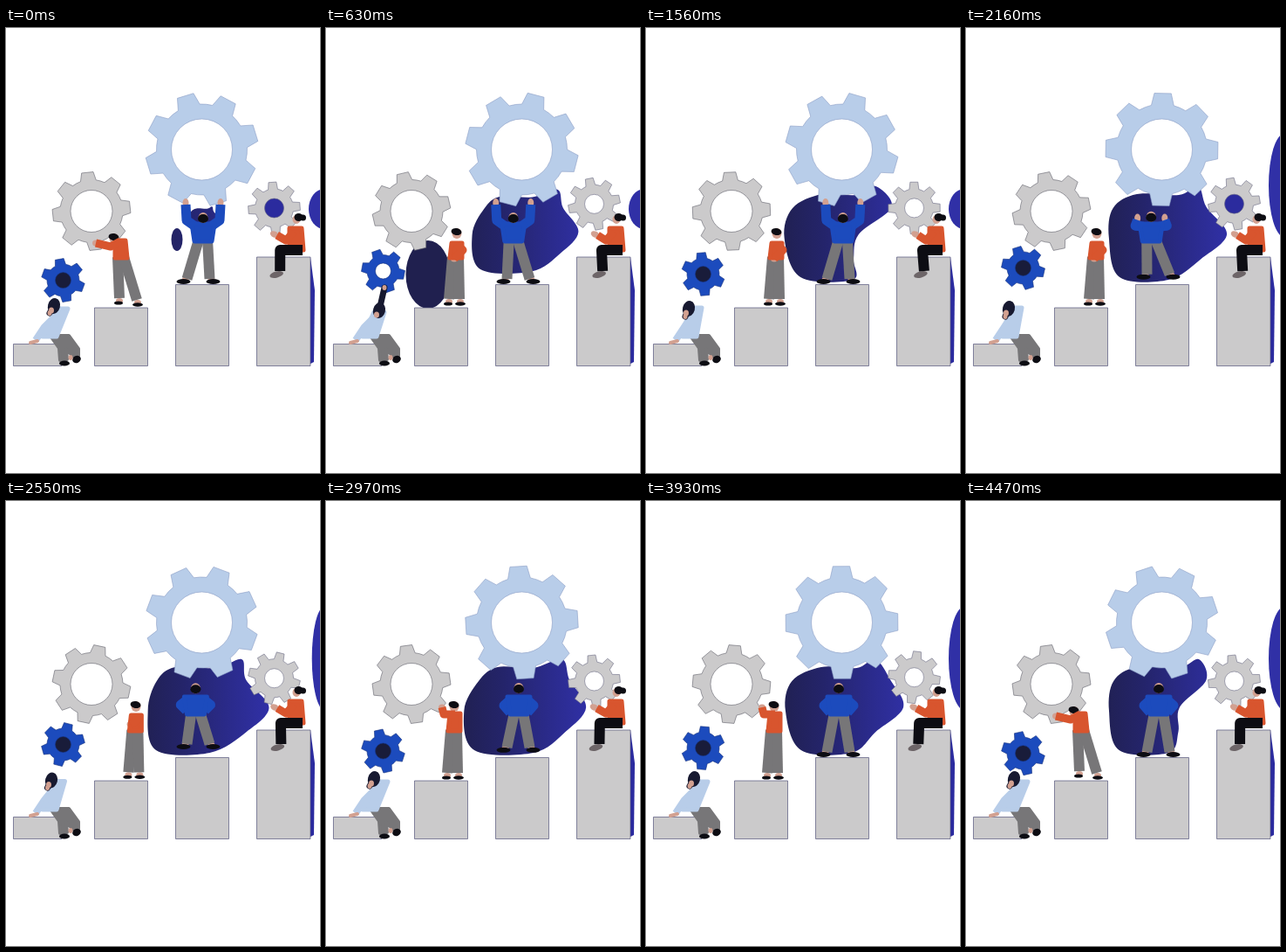
An HTML page for the animation above (4500 ms loop, 360 by 509 pixels).

```html
<!DOCTYPE html>
<html lang="en">
<head>
<meta charset="utf-8">
<title>Gears</title>
<style>
html, body { margin: 0; width: 100%; height: 100%; overflow: hidden; background: #fff; }
svg { display: block; width: 100vw; height: 100vh; }
</style>
</head>
<body>
<svg viewBox="0 0 360 509" stroke-linejoin="round">
  <defs>
    <linearGradient id="ink" gradientUnits="userSpaceOnUse" x1="150" y1="0" x2="300" y2="0">
      <stop offset="0" stop-color="#20204f"/>
      <stop offset=".35" stop-color="#24246a"/>
      <stop offset="1" stop-color="#3030a6"/>
    </linearGradient>
  </defs>
  <g id="scene"></g>
</svg>
<script>
const LOOP = 4500, STEP = 30;
const C = {
  box: '#cbcacb', pale: '#b8cde9', blue: '#1c4bbd', orange: '#d8552e',
  skin: '#d2a090', pants: '#777678', black: '#0d0d13', dark: '#171930', ink: 'url(#ink)'
};

// Timing helpers, t in ms
const wave = (t, cycles, peak = 0) => Math.cos(2 * Math.PI * cycles * (t - peak) / LOOP);
const near = (t, when, span) => Math.abs(t - when) < span;
const bump = (t, when, span) => near(t, when, span) ? (1 + Math.cos(Math.PI * (t - when) / span)) / 2 : 0;
const ease = (t, from, to) => {
  const k = Math.max(0, Math.min(1, (t - from) / (to - from)));
  return k * k * (3 - 2 * k);
};
const mix = (a, b, k) => a.map((v, i) => v + (b[i] - v) * k);

// SVG helpers
const n = v => +v.toFixed(2);
const path = (d, fill, more = '') => `<path d="${d}" fill="${fill}" ${more}/>`;
const oval = (x, y, rx, ry, fill, turn = 0) =>
  `<ellipse cx="${n(x)}" cy="${n(y)}" rx="${n(rx)}" ry="${n(ry)}" fill="${fill}" transform="rotate(${turn} ${n(x)} ${n(y)})"/>`;
const limb = (p, w, color, cap = 'butt') =>
  `<polyline points="${p.map(n)}" fill="none" stroke="${color}" stroke-width="${w}" stroke-linecap="${cap}"/>`;
const poly = (p, fill, round = 0) =>
  `<polygon points="${p.map(n)}" fill="${fill}" stroke="${fill}" stroke-width="${round}"/>`;
const trunk = (sx, sy, hx, hy, ws, wh, fill) =>
  poly([sx - ws, sy, sx + ws, sy, hx + wh, hy, hx - wh, hy], fill, 5);

// Closed Catmull-Rom curve through [x, y] points
function blob(pts, fill) {
  const pt = i => pts[(i + pts.length) % pts.length];
  let d = 'M' + pt(0).map(n);
  for (let i = 0; i < pts.length; i++) {
    const [a, b, c, e] = [pt(i - 1), pt(i), pt(i + 1), pt(i + 2)];
    const q = [0, 1].map(k => b[k] + (c[k] - a[k]) / 6);
    const r = [0, 1].map(k => c[k] - (e[k] - b[k]) / 6);
    d += 'C' + [...q, ...r, ...c].map(n);
  }
  return path(d + 'Z', fill);
}

function gear(x, y, turn, teeth, R, root, hole, fill, edge) {
  const step = 360 / teeth;
  const p = (r, deg) => {
    const a = (deg + turn - 90) * Math.PI / 180;
    return n(x + r * Math.cos(a)) + ' ' + n(y + r * Math.sin(a));
  };
  let d = '';
  for (let i = 0; i < teeth; i++) {
    const c = i * step;
    d += (i ? `A${root} ${root} 0 0 1 ` : 'M') + p(root, c - .32 * step) +
      'L' + p(R, c - .19 * step) + 'L' + p(R, c + .19 * step) + 'L' + p(root, c + .32 * step);
  }
  d += `A${root} ${root} 0 0 1 ${p(root, -.32 * step)}Z`;
  d += `M${n(x - hole)} ${n(y)}a${hole} ${hole} 0 1 0 ${2 * hole} 0a${hole} ${hole} 0 1 0 ${-2 * hole} 0Z`;
  return path(d, fill, `fill-rule="evenodd" stroke="${edge}" stroke-width=".6"`);
}

const OUTLINE = [
  [160, 240], [171, 206], [198, 190], [240, 191], [267, 181],
  [279, 205], [302, 236], [272, 264], [236, 288], [174, 285]
];

function clouds(t) {
  // The main cloud opens around the lifter; its lower right side draws in now and then.
  const size = .25 + .75 * ease(t, 0, 850);
  const pinch = ((1 + Math.cos(2 * Math.PI * (t - 1560) / 2910)) / 2) ** 5;
  const main = OUTLINE.map(([x, y], i) => {
    if (x > 270 && y > 220) x += (242 - x) * pinch;
    x += 4 * wave(t, 2, i * 700);
    return [226 + (x - 226) * size, 212 + (y - 212) * size];
  });
  const swing = bump(t, 630, 620);
  const tall = ease(t, 1600, 2160), shown = 1 - bump(t, 2970, 600);
  return blob(main, C.ink) +
    oval(196 - 79 * swing, 242 + 40 * swing, 6.5 + 19 * swing, 13 + 26 * swing, C.ink) +
    oval(365, 207 - 27 * tall, 18 * shown, 23 + 36 * tall, C.ink);
}

function boxes() {
  const box = (x, y, w) =>
    `<rect x="${x}" y="${y}" width="${w}" height="${386.5 - y}" fill="${C.box}" stroke="#55557c" stroke-width=".7"/>`;
  return poly([349, 262, 354, 300, 353, 382, 349, 384], '#2b2ba0') +
    box(8.5, 361.5, 55.5) + box(101.5, 320, 61) + box(194.5, 293.5, 61) + box(287.5, 262, 61.5);
}

function gears(t) {
  const turns = teeth => teeth * t / LOOP;
  const by = 281.5 + 4 * wave(t, 3) + 4 * wave(t, 1, 4000);
  const ry = 203.5 + 2.5 * wave(t, 3);
  const lit = near(t, 0, 250) || near(t, 2160, 250);
  return gear(224.5, 139, -17 + 45 * turns(5), 8, 65, 52, 35, C.pale, '#8a9cc4') +
    gear(98, 209.5, -6 + 45 * turns(6), 8, 45, 36, 24, C.box, '#62626c') +
    oval(65.5, by, 10, 10, near(t, 630, 350) ? '#fff' : '#191c3a') +
    gear(65.5, by, -10 + 60 * turns(6), 6, 25, 18.5, 9, C.blue, '#16327c') +
    oval(307.5, ry, 12, 12, lit ? '#2b2b9e' : '#fff') +
    gear(307.5, ry, -4 + 45 * turns(6), 8, 30, 22, 11, C.box, '#6b6b84');
}

// Joints: head, shoulder, hand
const SIT = { hold: [55, 318, 65, 321, 50, 326], reach: [61, 323, 61, 325, 67, 297], rest: [49, 321, 58, 320, 45, 330] };

function sitter(t) {
  const up = mix(SIT.hold, SIT.reach, bump(t, 630, 630));
  const rest = ease(t, 1000, 1500) - ease(t, 2200, 2900);
  const [hx, hy, sx, sy, ax, ay] = mix(up, SIT.rest, rest);
  return poly([51, 352, 72, 352, 83, 367, 83, 375, 77, 376, 69, 367, 70, 379, 62, 380, 61, 366], C.pants, 4) +
    oval(81, 379, 5, 4, C.black, -25) + oval(67, 383.5, 6, 3, C.black) +
    oval(74, 377, 2.5, 3, C.skin) +
    limb([sx, sy, 44, 342, 34, 357], 8, C.pale) +
    trunk(sx, sy, 50, 353, 6, 8, C.pale) +
    limb([36, 358, 28, 360], 4, C.skin, 'round') +
    limb([hx, hy, ax, ay], 7, C.dark, 'round') +
    oval(hx, hy, 7, 9, C.dark, 15) + oval(hx - 3, hy + 5, 3, 3.5, C.skin) +
    oval(ax, ay, 2.5, 3, C.skin);
}

// Joints: head, shoulder, hip, elbow, hand, left foot, right foot
const PUSH = {
  lean: [124, 241, 131, 243, 132, 264, 120, 250, 103, 246, 130, 312, 151, 314],
  stand: [150, 235, 150, 246, 149, 264, 157, 254, 147, 264, 141, 313, 154, 313],
  reach: [147, 235, 148, 243, 147, 264, 135, 244, 133, 236, 139, 314, 152, 314]
};

function pusher(t) {
  const upright = mix(PUSH.stand, PUSH.reach, ease(t, 2300, 2970));
  const leaning = 1 - ease(t, 50, 550) + ease(t, 3980, 4440);
  const [hx, hy, sx, sy, px, py, ex, ey, ax, ay, lx, ly, rx, ry] = mix(upright, PUSH.lean, leaning);
  return oval(lx, ly, 4, 3, C.skin) + oval(lx - 1, ly + 2.5, 5, 2, C.black) +
    oval(rx, ry, 4, 3, C.skin) + oval(rx, ry + 2.5, 6, 2.2, C.black) +
    limb([px - 4, py - 2, lx, ly - 3], 12, C.pants) + limb([px + 3, py - 2, rx - 1, ry - 3], 12, C.pants) +
    oval(ax, ay, 4, 3.5, C.skin) +
    trunk(sx, sy, px, py - 1, 6, 7, C.orange) +
    oval(hx, hy, 5.5, 6, C.skin) + oval(hx - .5, hy - 2, 6, 4, C.black, 10) +
    limb([sx, sy + 1, ex, ey, ax, ay], 9, C.orange);
}

function lifter(t) {
  const up = 1 - ease(t, 1700, 2700);
  const lean = 6 * (1 - wave(t, 3)) * (1 - ease(t, 2200, 2900));
  const x = 221 + 5 * up - lean, foot = 290 - 9 * bump(t, 2560, 900);
  let feet = '', hands = '', legs = '', arms = '';
  for (const side of [-1, 1]) {
    const fx = 220.5 + side * 15, hx = x + side * (10 + 10 * up), hy = 242 - 40 * up;
    feet += oval(fx, foot - 2, 4, 3, C.skin) + oval(fx + side * 2, foot, 8, 3, C.black);
    legs += limb([x + side * 5, 242, fx - side * 2, foot - 3], 12, C.pants);
    hands += oval(hx, hy - 2, 3.5, 5, C.skin);
    arms += limb([x + side * 9, 227, x + side * (17 + 2 * up), 234 - 14 * up, hx, hy], 11, C.blue);
  }
  return feet + legs + hands + arms + trunk(x, 224, x, 244, 13, 10, C.blue) +
    oval(x, 214 + 3 * up, 5.5, 6, C.skin) + oval(x, 215 + 3 * up, 6, 5, C.black);
}

function reader(t) {
  const swing = wave(t, 1, 1400);
  const ax = 308 + swing, kx = 314 + 2 * swing, fx = 311.5 + 3.5 * swing;
  return oval(fx, 282, 8, 3.5, '#6d6568', -14) +
    oval(ax, 236, 5, 3.5, C.skin, 25) +
    trunk(332, 229, 333, 254, 7, 8, C.orange) +
    limb([340, 254, kx + 1, 254, fx + 4, 278], 12, C.black) +
    limb([330, 233, 321, 243, ax + 3, 237], 9, C.orange) +
    oval(333, 219, 4.5, 5, C.skin) + oval(335.5, 216.5, 5, 4.5, C.black) + oval(340.5, 217, 3.5, 3.5, C.black);
}

const scene = document.getElementById('scene');
function draw(t) {
  scene.innerHTML = [clouds, boxes, gears, sitter, pusher, lifter, reader].map(part => part(t)).join('');
}

let start;
function tick(now) {
  start ??= now;
  draw(Math.floor((now - start) % LOOP / STEP) * STEP);
  requestAnimationFrame(tick);
}
draw(0);
requestAnimationFrame(tick);
</script>
</body>
</html>
```
